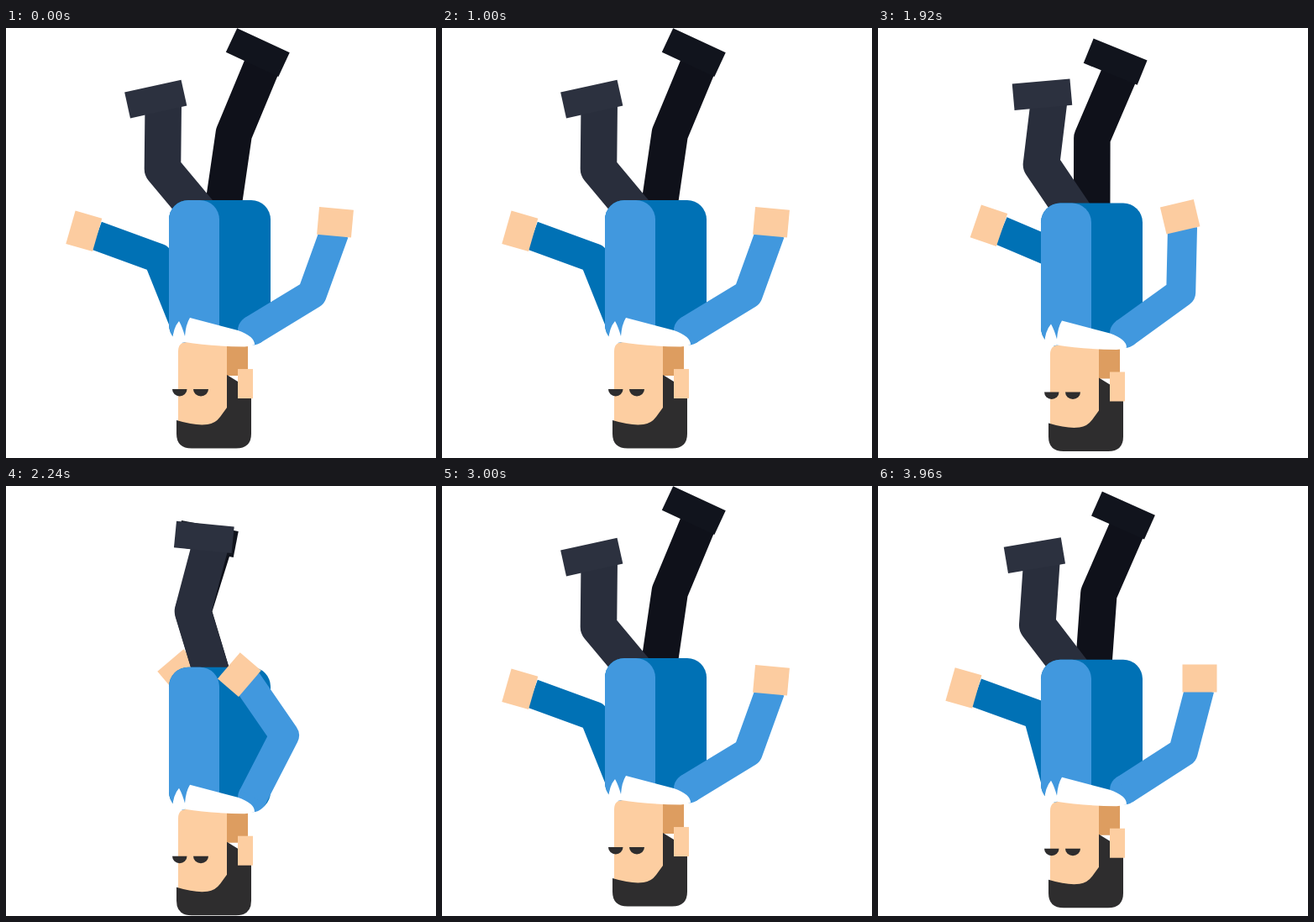
Recreate the animation shown at these times as an HTML page. Size 512 by 512 pixels, loop 4000 ms.

```html
<!DOCTYPE html>
<html lang="en">
<head>
<meta charset="utf-8">
<title>Upside-down walk</title>
<style>
  html, body { margin: 0; width: 100%; height: 100%; overflow: hidden; background: #fff; }
  svg { display: block; width: 100%; height: 100%; }
  polyline { fill: none; stroke-linejoin: round; }
  .arm { stroke-width: 35; }
  .leg { stroke-width: 43.5; }
</style>
</head>
<body>
<svg viewBox="0 0 512 512">
  <g id="body">
    <g id="farArm">
      <polyline class="arm" stroke="#0071b5"/>
      <rect x="-16.5" y="-20.5" width="33" height="41" fill="#fccca0"/>
    </g>
    <g id="farLeg">
      <polyline class="leg" stroke="#0f111a"/>
      <rect x="-34.5" y="-15.8" width="69" height="31.6" fill="#11141d"/>
    </g>
    <g id="nearLeg">
      <polyline class="leg" stroke="#292e3c"/>
      <rect x="-34.5" y="-15.8" width="69" height="31.6" fill="#2c313f"/>
    </g>
    <rect x="194" y="205" width="121" height="171.5" rx="23" fill="#0071b5"/>
    <path d="M194 228a23 23 0 0 1 23-23h14a23 23 0 0 1 23 23V376H217a23 23 0 0 1-23-23Z" fill="#4198de"/>

    <path d="M263 372H288V414H263Z" fill="#dd9d60"/>
    <path d="M205 385Q205 374 216 374H263V476H205Z" fill="#fdcea1"/>
    <path d="M203 467Q226 474 240 472Q249 471 255 463L263 452V413L276 421V436H292V483Q292 500.500 274 500.500H221Q203 500.500 203 483Z" fill="#2e2d2e"/>
    <path d="M276 406H294V441H276Z" fill="#fdcea1"/>
    <g id="eyes" fill="#2e2d2e">
      <path d="M198 0H215.500A8.750 8.500 0 0 1 198 0Z"/>
      <path d="M223 0H241A9 8.500 0 0 1 223 0Z"/>
    </g>

    <g id="nearArm">
      <circle cx="293.5" cy="360" r="17.500" fill="#4198de"/>
      <polyline class="arm" stroke="#4198de"/>
      <rect x="-16.5" y="-20.5" width="33" height="41" fill="#fccca0"/>
    </g>
    <path d="M198 373Q199 357 206 349Q210 356 213 367Q214 353 219 345L276 360Q296 367 296 377Q291 379 284 379.500Q244 379 213 374Q205 375 204 382Z" fill="#fff"/>
  </g>
</svg>
<script>
const CYCLE = 1000, HALF = CYCLE / 2, LOOP = 4000;
const $ = id => document.getElementById(id);

// Joint angles in degrees. Arms swing back and forth evenly, so they use the distance from the cycle start.
const armTimes = [0, 40, 80, 120, 200, 300, 400, 440, 500];
const legTimes = [0, 80, 400, 500, 560, 600, 920, 960, 1000];

const arms = [
  { id: 'nearArm', shoulder: [293.5, 360], reach: 90, bias: -2, tilt: -14.7,
    upper: [-31.3, -32.8, -36, -42, -55, -74, -94, -102.2, -116],
    fore: [-70, -75.5, -89, -100, -118, -134, -144, -147.5, -154] },
  { id: 'farArm', shoulder: [212, 351], reach: 94, bias: 0, tilt: -4,
    upper: [-112, -105, -85, -75, -60, -42, -25, -16, -8],
    fore: [-160, -160, -157, -152, -135, -114, -95, -82.5, -68] }
];

const legs = [
  { id: 'nearLeg',
    thigh: [-130, -124, -90, -83, -90, -93.2, -124, -127.4, -130],
    shank: [-89.5, -83, -67.5, -67.5, -67.8, -68.5, -83, -86, -89.5],
    shoe: [-12.6, -5, 16, 23, 17, 17.5, -5, -9.5, -12.6] },
  { id: 'farLeg',
    thigh: [-81.6, -90, -123.2, -130, -124.4, -119, -90, -86, -81.6],
    shank: [-67.4, -66.8, -78.3, -85, -78.3, -77.6, -66.8, -66.4, -67.4],
    shoe: [25, 22, 0, -8, -2.5, 0, 22, 24, 25] }
];

function sample(times, values, t) {
  let i = 1;
  while (i < times.length - 1 && t > times[i]) i++;
  const k = (t - times[i - 1]) / (times[i] - times[i - 1]);
  return values[i - 1] + k * (values[i] - values[i - 1]);
}

function step([x, y], degrees, length) {
  const a = degrees * Math.PI / 180;
  return [x + length * Math.cos(a), y + length * Math.sin(a)];
}

function drawLimb(id, points, end, angle) {
  const limb = $(id);
  limb.querySelector('polyline').setAttribute('points', points.join(' '));
  limb.querySelector('rect').setAttribute('transform', `translate(${end}) rotate(${angle})`);
}

function drawArm(arm, t) {
  const upper = sample(armTimes, arm.upper, t);
  const fore = sample(armTimes, arm.fore, t);
  const elbow = step(arm.shoulder, upper, 83);
  const hand = step(elbow, fore + arm.bias, arm.reach);
  drawLimb(arm.id, [arm.shoulder, elbow, step(elbow, fore, 78)], hand, fore + arm.tilt);
}

function drawLeg(leg, t) {
  const thigh = sample(legTimes, leg.thigh, t);
  const shank = sample(legTimes, leg.shank, t);
  // The hip pivot sits beside the thigh's centre line.
  const knee = step([276, 241.5], thigh - 10.6, 116);
  const length = 110 - 0.65 * (shank - thigh);
  const foot = step(knee, shank - 6.2, length);
  drawLimb(leg.id, [step(knee, thigh, -100), knee, step(knee, shank, length - 6)],
    foot, sample(legTimes, leg.shoe, t));
}

function draw(now) {
  const time = now % LOOP, phase = time % CYCLE;
  const swing = Math.min(phase, CYCLE - phase);
  const bounce = 0.0445 * Math.min(swing, HALF - swing);
  $('body').setAttribute('transform', `translate(0 ${bounce})`);
  arms.forEach(arm => drawArm(arm, swing));
  legs.forEach(leg => drawLeg(leg, phase));
  const open = Math.min(1, Math.abs(time - 680) / 120);
  $('eyes').setAttribute('transform', `translate(0 ${430 + (1 - open) * 2}) scale(1 ${Math.max(open, 0.15)})`);
}

const start = performance.now();
function tick() {
  draw(performance.now() - start);
  requestAnimationFrame(tick);
}
tick();
</script>
</body>
</html>
```
